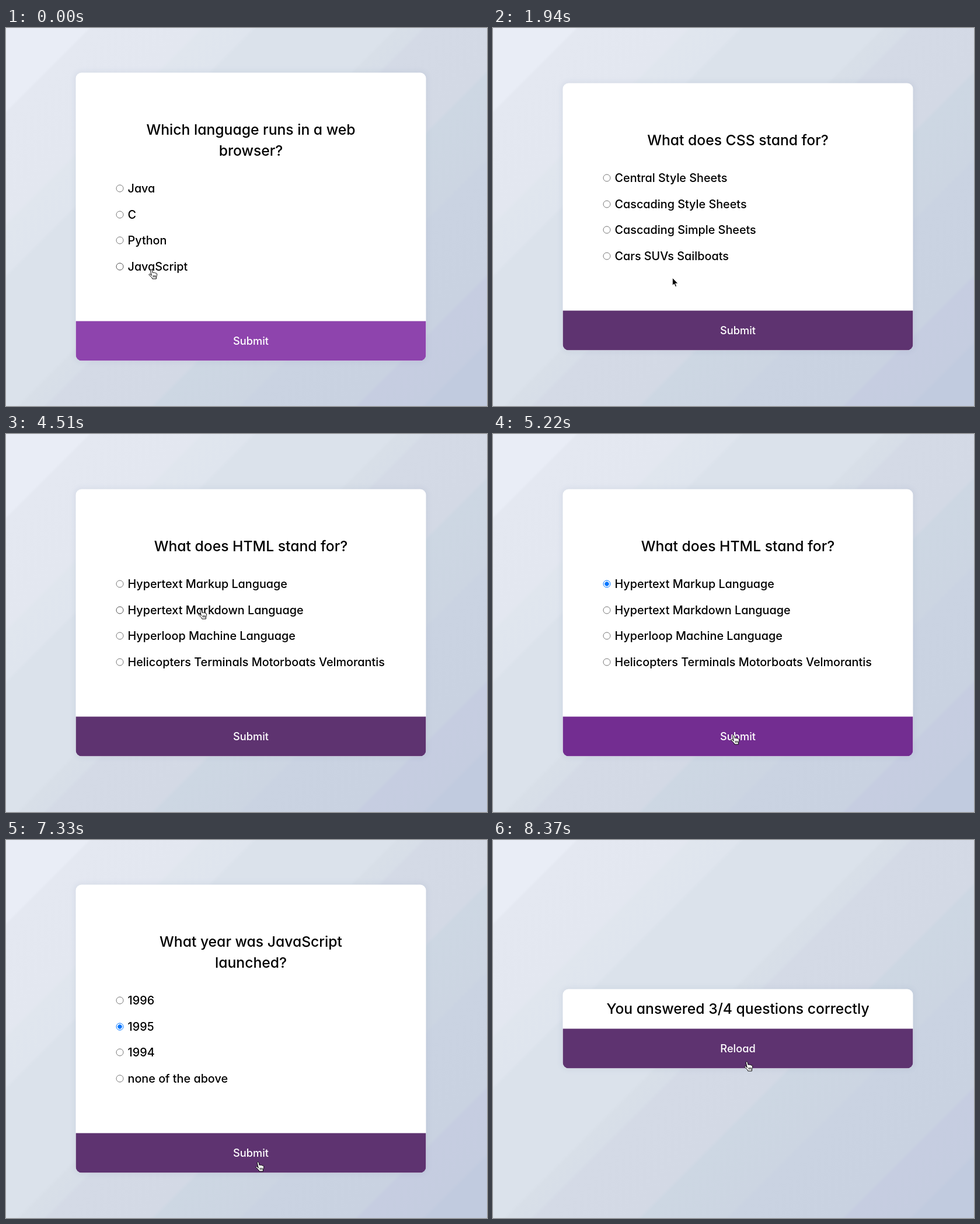
Animation of 824x648 px, one loop 8450 ms. Source, as an HTML page:

```html
<!DOCTYPE html>
<html lang="en">
<head>
<meta charset="utf-8">
<title>Quiz</title>
<style>
  html, body { margin: 0; width: 100%; height: 100%; overflow: hidden; }
  body {
    position: relative;
    color: #000;
    font-family: Inter, "Open Sans", sans-serif;
    font-weight: 500;
    font-feature-settings: "cv11";
    font-optical-sizing: none;
    background: linear-gradient(135deg,
      #e9edf6 9.5%, #e4e8f1 10%, #e3e7f0 22.5%, #e0e6ee 23.2%, #dfe5ee 28.6%,
      #dbe2eb 29.2%, #dbe2eb 45.1%, #d8dfe8 45.7%, #d7dee8 48.3%,
      #d4dae6 48.9%, #d3d9e5 60.8%, #cdd7e3 61.4%, #ccd5e2 71%,
      #cad3e2 71.6%, #c9d2e1 84.5%, #c6cde1 85.1%, #c5cde0 92.3%, #c1cbdf 92.9%);
  }
  .card {
    position: absolute;
    left: 0;
    top: 0;
    width: 600px;
    transform: translate(119.5px, calc(323.5px - 50%));
    border-radius: 10px;
    overflow: hidden;
    background: #fff;
    box-shadow: 0 0 10px 2px rgba(100, 115, 160, .1);
  }
  .inner { padding: 64px; }
  h2 {
    margin: 0;
    padding: 15px 16px 17px;
    font-size: 24.7px;
    font-weight: 500;
    line-height: 36px;
    text-align: center;
    white-space: nowrap;
  }
  ul { margin: 16px 0; padding: 0; list-style: none; }
  li { height: 28.5px; margin-bottom: 16px; }
  li:last-child { margin-bottom: 0; }
  label {
    display: inline-flex;
    align-items: center;
    height: 29px;
    padding-left: 5px;
    font-size: 19.8px;
    line-height: 29px;
    white-space: nowrap;
  }
  label i {
    flex: none;
    box-sizing: border-box;
    width: 13px;
    height: 13px;
    margin-right: 7px;
    border: 1px solid #767676;
    border-radius: 50%;
    background: #fff;
  }
  .hover i { border-color: #4f4f4f; }
  .down i { border-color: #8d8d8d; background: #f5f5f5; }
  .checked i {
    border-color: #0075ff;
    background: radial-gradient(circle, #0075ff 3.4px, #fff 4px);
  }
  .checked.hover i {
    border-color: #005cc8;
    background: radial-gradient(circle, #005cc8 3.4px, #fff 4px);
  }
  .button {
    height: 68px;
    background: #8e44ad;
    color: #fff;
    font-size: 18.2px;
    line-height: 67px;
    text-align: center;
  }
  .button.hover { background: #732d91; }
  .button.focus { background: #5e3370; }
  #pointer { position: absolute; left: 0; top: 0; overflow: visible; }
  #pointer path { stroke-linejoin: round; stroke-linecap: round; }
</style>
</head>
<body>
<div class="card" id="card"></div>
<svg id="pointer" width="16" height="18">
  <g id="hand" transform="translate(-5 -2)" fill="#fff" stroke="#000">
    <path d="M5.2 11 3.4 3C2.9.6 5.4.2 6 2.2L7.2 6.6C8 5.6 9.4 5.8 9.7 6.8
      10.6 6 11.9 6.4 12.2 7.4 13.2 6.9 14.5 7.4 14.6 8.8
      14.7 11.5 14 12.5 13.4 14V17H6.8C6.3 14.5 3.5 12.5 1.4 10.6.2 9.4 1.6 8 3.2 9.2L4.9 10.6Z"/>
    <path d="M8.2 11.3v2.8M10.1 11.3v2.8M12 11.3v2.8" stroke-width=".9"/>
  </g>
  <path id="arrow" d="M.3.3V13.6L3.3 10.8 5.4 15.6 7.6 14.7 5.6 10H9.8Z"
    fill="#000" stroke="#fff" stroke-width="1"/>
</svg>
<script>
const LOOP = 8450;
const PRESS = 90;

// at: card appears, row/pick: option pressed, push: button pressed
const cards = [
  { at: 0, title: 'Which language runs in a web<br>browser?',
    options: ['Java', 'C', 'Python', 'JavaScript'], row: 3, pick: 620, push: 1320 },
  { at: 1410, title: 'What does CSS stand for?',
    options: ['Central Style Sheets', 'Cascading Style Sheets', 'Cascading Simple Sheets', 'Cars SUVs Sailboats'],
    row: 3, pick: 2920, push: 3710 },
  { at: 3800, title: 'What does HTML stand for?',
    options: ['Hypertext Markup Language', 'Hypertext Markdown Language', 'Hyperloop Machine Language',
      'Helicopters Terminals Motorboats Velmorantis'],
    row: 0, pick: 4950, push: 5580 },
  { at: 5670, title: 'What year was JavaScript<br>launched?',
    options: ['1996', '1995', '1994', 'none of the above'], row: 1, pick: 6810, push: 7330 },
  { at: 7420, title: 'You answered 3/4 questions correctly', push: 8370 },
];

// Each move lands on a new spot in a number of visible steps
const start = { x: 249, y: 415 };
const moves = [
  { from: 970, to: 1230, steps: 4, x: 340, y: 532 },
  { from: 1680, to: 1940, steps: 4, x: 307, y: 428 },
  { from: 2030, to: 2470, steps: 6, x: 293, y: 406 },
  { from: 2560, to: 2560, steps: 1, x: 293, y: 403 },
  { from: 3280, to: 3620, steps: 5, x: 357, y: 515 },
  { from: 4340, to: 4600, steps: 4, x: 330, y: 262 },
  { from: 5130, to: 5220, steps: 2, x: 412, y: 517 },
  { from: 5940, to: 6290, steps: 5, x: 258, y: 331 },
  { from: 6380, to: 6720, steps: 5, x: 240, y: 322 },
  { from: 6980, to: 7150, steps: 3, x: 432, y: 553 },
  { from: 7680, to: 8280, steps: 8, x: 435, y: 381 },
];

const byId = id => document.getElementById(id);
const cardBox = byId('card'), pointer = byId('pointer'), hand = byId('hand'), arrow = byId('arrow');
const smooth = p => p * p * (3 - 2 * p);
let shown = null;

function pointerAt(t) {
  let spot = start;
  for (const m of moves) {
    if (t < m.from) break;
    const gap = (m.to - m.from) / Math.max(1, m.steps - 1);
    // Change times are rounded to 10 ms, hence the small allowance
    const step = t >= m.to ? m.steps : Math.min(m.steps, 1 + Math.floor((t - m.from + 4) / gap));
    const p = smooth(step / m.steps);
    spot = { x: spot.x + (m.x - spot.x) * p, y: spot.y + (m.y - spot.y) * p };
  }
  return spot;
}

function build(card) {
  const title = `<h2>${card.title}</h2>`;
  const items = (card.options || []).map(o => `<li><label><i></i><span>${o}</span></label></li>`).join('');
  cardBox.innerHTML = card.options
    ? `<div class="inner">${title}<ul>${items}</ul></div><div class="button">Submit</div>`
    : `${title}<div class="button">Reload</div>`;
  shown = card;
}

function isOver(el, { x, y }) {
  const r = el.getBoundingClientRect();
  return x >= r.left && x < r.right && y >= r.top && y < r.bottom;
}

function render(t) {
  const index = cards.findLastIndex(c => t >= c.at);
  const card = cards[index];
  if (card !== shown) build(card);

  const spot = pointerAt(t);
  let clickable = false;
  const hover = el => {
    const over = isOver(el, spot);
    el.classList.toggle('hover', over);
    clickable ||= over;
  };

  cardBox.querySelectorAll('label').forEach((label, row) => {
    hover(label);
    const picked = row === card.row && t >= card.pick;
    label.classList.toggle('down', picked && t < card.pick + PRESS);
    label.classList.toggle('checked', picked && t >= card.pick + PRESS);
  });

  const button = cardBox.querySelector('.button');
  hover(button);
  // The button keeps its focus on the next card until an option is pressed
  button.classList.toggle('focus', t >= card.push || (index > 0 && t < card.pick));

  pointer.style.transform = `translate(${Math.round(spot.x)}px, ${Math.round(spot.y)}px)`;
  hand.style.display = clickable ? '' : 'none';
  arrow.style.display = clickable ? 'none' : '';
}

function frame() {
  render(performance.now() % LOOP);
  requestAnimationFrame(frame);
}
frame();
</script>
</body>
</html>
```
